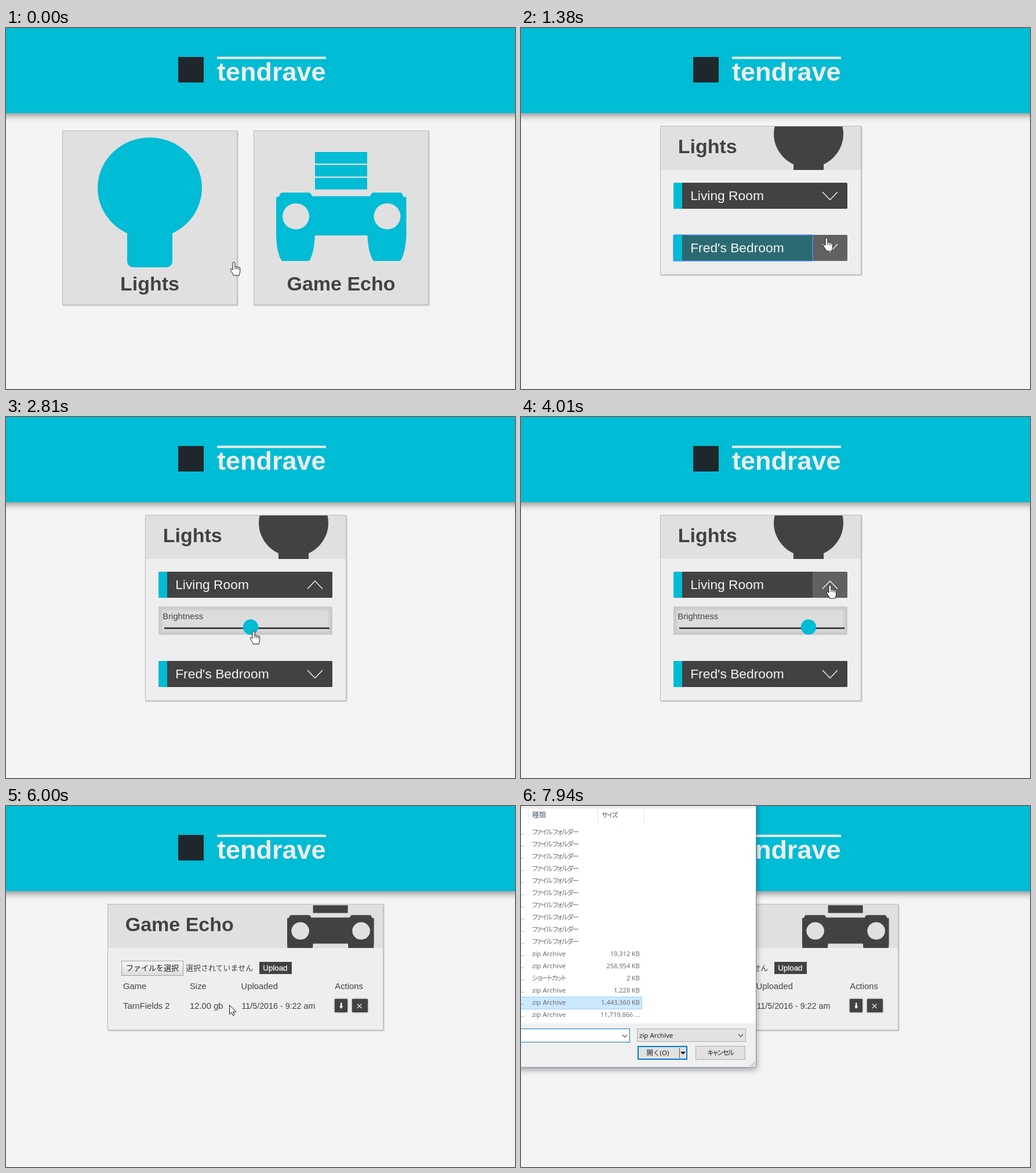
An HTML page that plays this animation: 878x623 px, repeating every 7990 ms.

```html
<!DOCTYPE html>
<html lang="en">
<head>
<meta charset="utf-8">
<title>Home panel</title>
<style>
html, body { margin: 0; width: 100%; height: 100%; overflow: hidden; background: #f4f4f4; }
svg { display: block; font-family: "Liberation Sans", Arial, sans-serif; white-space: pre; }
.title { font-weight: bold; font-size: 34px; fill: #424242; }
.row { font-size: 22.8px; fill: #f4f4f4; }
.cell { font-size: 14.8px; fill: #424242; }
.jp { font: 13px "Noto Sans CJK JP", "Noto Sans CJK", sans-serif; fill: #424242; }
.card { stroke: #bdbdbd; filter: drop-shadow(1px 1px 1px rgba(0,0,0,.28)); }
.file { font: 11.5px "Noto Sans", "Noto Sans CJK JP", sans-serif; fill: #6d6d6d; }
.kana { font: 11.5px "Noto Sans CJK JP", "Noto Sans CJK", sans-serif; fill: #6d6d6d;
  font-feature-settings: "palt"; letter-spacing: -1.4px; }
.dark { fill: #1e1e1e; }
</style>
</head>
<body>
<svg id="stage" width="878" height="623" viewBox="0 0 878 623"></svg>
<script>
const LOOP = 7990, CYAN = '#00bcd4', DARK = '#424242';
const stage = document.getElementById('stage');

// ---- markup helpers ----
const box = (x, y, w, h, fill, more = '') =>
  `<rect x="${x}" y="${y}" width="${w}" height="${h}" fill="${fill}" ${more}/>`;
const label = (x, y, cls, text, more = '') => `<text x="${x}" y="${y}" class="${cls}" ${more}>${text}</text>`;
const line = (d, color, width = 1, more = '') =>
  `<path d="${d}" fill="none" stroke="${color}" stroke-width="${width}" ${more}/>`;
const group = (id, inner, more = '') => `<g id="${id}" ${more}>${inner}</g>`;
const centred = 'text-anchor="middle"', toRight = 'text-anchor="end"';

const bulb = `<ellipse cx="248" cy="276" rx="90" ry="87"/><rect x="209" y="330" width="78" height="83" rx="10"/>`;
const hole = x => `M${x - 23} 325a23 22.5 0 1 0 46 0a23 22.5 0 1 0-46 0Z`;
const pad = [214, 236.3, 258.6].map(y => `<rect x="533" y="${y}" width="90" height="20"/>`).join('') +
  `<path fill-rule="evenodd" d="M466 293Q466 291 471 291Q472 284 477 284H522Q526 284 528 290.300H628
  Q630 284 635 284H680Q684 284 685 291Q690.500 291 690.500 293V358Q689 390 680 402H634Q625 390 623.500 358H533
  Q531 390 523 402H476Q467 390 466 358Z${hole(500)}${hole(657.5)}"/>`;

const homeCard = (x, name, icon) =>
  box(x + .5, 177.5, 301, 300, '#e0e0e0', 'class="card"') +
  `<g fill="${CYAN}">${icon}</g>` + label(x + 151, 453, 'title', name, centred);

const panel = (id, x, w, h, name, icon, dx) =>
  box(x + .5, 169.5, w, h, '#eee', `class="card" id="${id}Card"`) +
  box(x + 1, 170, w - 1, 75, '#e0e0e0') +
  `<g clip-path="url(#headClip)"><g fill="${DARK}" transform="translate(${dx} -1.100) scale(.6667)">${icon}</g></g>` +
  label(x + 30.7, 216, 'title', name);

const lightRow = (id, y, name) => group(id,
  box(263, y, 300, 45, DARK, 'rx="2.500"') +
  box(278, y, 225, 45, DARK, `id="${id}Main"`) +
  `<path id="${id}Side" d="M503 ${y}H560.500a2.500 2.500 0 0 1 2.500 2.500V${y + 42.5}a2.500 2.500 0 0 1-2.500 2.500H503Z" fill="${DARK}"/>` +
  `<path d="M278 ${y}H265.500a2.500 2.500 0 0 0-2.500 2.500V${y + 42.5}a2.500 2.500 0 0 0 2.500 2.500H278Z" fill="${CYAN}"/>` +
  label(292.2, y + 30, 'row', name) +
  line(`M520 ${y + 16}L533 ${y + 29.5}L546 ${y + 16}`, '#f4f4f4', 1.4, `id="${id}Arrow"`));

const slider = group('slider',
  box(263, 327, 300, 49, '#cacaca') +
  box(269, 333, 288, 37, '#dcdcdc', 'style="filter:blur(2px)"') +
  label(270.3, 349, 'cell', 'Brightness') + box(273, 363, 285, 3, DARK) +
  `<circle id="thumb" cy="362.500" r="13.200" fill="${CYAN}"/>`, 'clip-path="url(#sliderClip)"');

const action = (x, w, mark) =>
  box(x, 333, w, 23, DARK, 'rx="1" style="filter:drop-shadow(0 0 1.500px rgba(0,0,0,.5))"') + mark;

const gamePage = panel('game', 175, 475, 217, 'Game Echo', pad, 174.3) +
  box(199.5, 267.5, 106, 25, 'url(#button)', 'stroke="#a0a0a0"') +
  label(207, 284, 'jp dark', 'ファイルを選択') + label(310, 284, 'jp', '選択されていません') +
  box(437, 269, 56, 21, DARK) +
  label(443.3, 284, 'cell', 'Upload', 'style="font-size:13.330px;fill:#f4f4f4;stroke:#f4f4f4;stroke-width:.3px"') +
  [[202, 'Game'], [317, 'Size'], [405.6, 'Uploaded'], [567.3, 'Actions']].map(c => label(c[0], 316, 'cell', c[1])).join('') +
  label(202, 350, 'cell', 'TarnFields 2') + label(317, 350, 'cell', '12.00 gb') +
  label(406.4, 350, 'cell', '11/5/2016 - 9:22 am', 'style="font-size:14.300px"') +
  action(567, 22, '<path d="M577 339.500h2.400v6h2l-3.200 4.500-3.200-4.500h2Z" fill="#fff"/>') +
  action(597, 27, line('M606 341.500l7.500 7.500m0-7.500l-7.500 7.500', '#e8e8e8', 1.3));

// ---- file dialog ----
const FOLDERS = 10;
const files = ['19,312 KB', '258,954 KB', '2 KB', '1,228 KB', '1,443,360 KB', '11,719,866 ...'];
const listRow = i => {
  const y = 49 + 21 * i, n = i - FOLDERS;
  const kind = n < 0 ? 'ファイル フォルダー' : n === 2 ? 'ショートカット' : 'zip Archive';
  return label(5, y, 'file', '...', toRight) + label(19, y, n >= 0 && n !== 2 ? 'file' : 'kana', kind) +
    (n < 0 ? '' : label(205, y, 'file', files[n], toRight + ' style="font-size:11px"'));
};
const chevron = (x, y) => line(`M${x - 4} ${y - 2}l4 4l4-4`, '#444', 1.1);
const combo = box(200.5, 384.5, 187, 22, '#e1e1e1', 'stroke="#adadad"') +
  label(204, 400, 'file dark', 'zip Archive') + chevron(379, 396);
const early = group('early',
  box(-30, 3, 137, 373, '#fff') + box(-30, 384, 218, 24, '#fff') +
  line('M-30 3.500H107M12.500 4V30', '#d8e4ea') + label(19, 20, 'jp', '種類', 'style="font-size:12px;fill:#4c607a"'));
const loaded = group('loaded',
  box(-30, 3, 435, 372, '#fff') + line('M-30 3.500H405', '#e2e2e2') +
  line('M12.500 4V30M132.500 4V30M212.500 4V30', '#e3e3e3') +
  label(19, 20, 'jp', '種類', 'style="font-size:12px;fill:#4c607a"') +
  label(139, 20, 'kana', 'サイズ', 'style="fill:#4c607a"') +
  box(-30, 329.5, 238.5, 21, '#cce8ff', 'id="pick" stroke="#99d1ff"') +
  Array.from({ length: 16 }, (_, i) => listRow(i)).join('') +
  box(-30, 384.5, 217.5, 23, '#fff', 'stroke="#1a72b8"') + chevron(179, 397) +
  box(202, 415, 84, 22, '#e1e1e1', 'stroke="#0078d7" stroke-width="2"') +
  line('M273.500 417V435', '#555') + '<path d="M275 424h9l-4.500 5Z" fill="#222"/>' +
  label(236, 430, 'file dark', '開く(O)', centred) +
  box(301.5, 414.5, 85, 23, '#e1e1e1', 'stroke="#adadad"') +
  label(344, 430, 'kana dark', 'キャンセル', centred) +
  [[401, 441], [398, 444], [401, 444], [395, 447], [398, 447], [401, 447]].map(p => box(p[0], p[1], 2, 2, '#b8b8b8')).join(''));
const dialog = group('dialog',
  box(-60, -60, 465.5, 511, '#f0f0f0', 'stroke="#7d97a5" style="filter:drop-shadow(0 3px 6px rgba(0,0,0,.4))"') +
  early + loaded + combo);

const header = box(-40, -40, 958, 187, CYAN, 'style="filter:drop-shadow(0 4px 6px rgba(0,0,0,.42))"') +
  box(297, 50, 44, 44, '#1e282c') + box(364, 49.5, 188, 4, '#eee') +
  label(364, 91, '', 'tendrave', 'font-weight="bold" font-size="45" fill="#eee"');

const cursor = group('cursor',
  `<path id="arrow" d="M.5 .5V16.500L4.200 13.200L6.600 18.500L9 17.500L6.600 12.200H11.800Z"/>` +
  `<path id="hand" d="M-2 13.500V2a2 2 0 0 1 4 0V8a1.700 1.700 0 0 1 3 .7a1.700 1.700 0 0 1 3 .9a1.500 1.500 0 0 1 2.700 1.400V16c0 2.500-1.300 3.500-1.500 7H-.5C-1 19.500-4.600 17-5.700 13c-.2-2 2.200-2.200 3.700.5ZM2 8v4M5 9v3.500M8 10v3"/>`,
  'fill="#fff" stroke="#111" stroke-linejoin="round"');

stage.innerHTML = `<defs>
  <clipPath id="headClip"><rect x="170" y="170" width="500" height="75"/></clipPath>
  <clipPath id="sliderClip"><rect id="sliderBox" x="263" y="327" width="300" height="49"/></clipPath>
  <linearGradient id="button" x2="0" y2="1"><stop stop-color="#f6f6f6"/><stop offset="1" stop-color="#dcdcdc"/></linearGradient>
</defs>` + box(0, 0, 878, 623, '#f4f4f4') + header +
  group('home', homeCard(97, 'Lights', bulb) + homeCard(427, 'Game Echo', pad)) +
  group('lights', panel('lights', 240, 346, 256, 'Lights', bulb, 330.7) +
    lightRow('living', 267, 'Living Room') + slider + lightRow('bed', 357, "Fred's Bedroom") +
    box(263, 357, 240, 45, 'none', 'id="ring" rx="1.500" stroke="#4d90fe" stroke-width="2" opacity=".7"')) +
  group('game', gamePage) + dialog + cursor;

// ---- motion ----
const $ = id => document.getElementById(id);
const show = (id, on) => $(id).style.display = on ? '' : 'none';
const ramp = (t, a, b) => Math.min(1, Math.max(0, (t - a) / (b - a)));
const smooth = k => k * k * (3 - 2 * k);

// time, x, y of the pointer tip
const path = [
  [30, 393, 404], [600, 300, 332], [1000, 300, 332], [1200, 400, 374], [1260, 430, 370], [1380, 527, 362],
  [1580, 533, 290], [1840, 533, 290], [2300, 420, 369], [2450, 420, 369], [2600, 403, 371], [2680, 403, 371],
  [2810, 427, 369], [2990, 496, 371], [3140, 496, 371], [3190, 501, 371], [3550, 501, 371], [3950, 533, 290],
  [4390, 533, 290], [4980, 490, 85], [5240, 490, 85], [5580, 568, 337], [5850, 568, 337], [6000, 385, 343],
  [6350, 250, 282], [6510, 248, 297], [6880, 248, 297], [7100, -40, 360]
];
function pointer(t) {
  const i = path.findIndex(p => p[0] > t);
  if (i === 0) return path[0].slice(1);
  if (i < 0) return path[path.length - 1].slice(1);
  const [a, b] = [path[i - 1], path[i]], k = smooth(ramp(t, a[0], b[0]));
  return [a[1] + (b[1] - a[1]) * k, a[2] + (b[2] - a[2]) * k];
}
const mix = k => `rgb(${[[66, 0], [66, 188], [66, 212]].map(c => Math.round(c[0] + (c[1] - c[0]) * k))})`;

function draw(t) {
  const page = t < 640 ? 'home' : t < 5160 ? 'lights' : t < 5670 ? 'home' : 'game';
  ['home', 'lights', 'game'].forEach(p => show(p, p === page));

  const [x, y] = pointer(t);
  const over = (l, top, r, b) => x >= l && x <= r && y >= top && y <= b;
  const open = smooth(ramp(t, 1640, 1790)) - smooth(ramp(t, 4090, 4290));
  const drop = 64 * open;

  // light rows and slider
  $('lightsCard').setAttribute('height', 256 + drop);
  $('bed').setAttribute('transform', `translate(0 ${drop})`);
  $('sliderBox').setAttribute('height', 49 * open);
  $('livingArrow').setAttribute('transform', t >= 1640 && t < 4090 ? 'rotate(180 533 289.750)' : '');
  const hot = [over(503, 267, 563, 312), over(503, 357 + drop, 563, 402 + drop)];
  $('livingSide').setAttribute('fill', hot[0] ? '#616161' : DARK);
  $('bedSide').setAttribute('fill', hot[1] ? '#616161' : DARK);
  $('bedMain').setAttribute('fill', mix(ramp(t, 1080, 1240) * (1 - ramp(t, 1260, 1440))));
  show('ring', t > 1180 && t < 1640);
  $('thumb').setAttribute('cx', t < 2450 ? 415 : t < 3200 ? x - 5 : 496);

  // dialog grows and fades in, then its list fills
  const grow = ramp(t, 6720, 6960), size = 1 - .059 * (1 - grow) ** 2;
  show('dialog', grow > 0);
  $('dialog').setAttribute('opacity', 1 - (1 - grow) ** 2.4);
  $('dialog').setAttribute('transform', `translate(-133 157) scale(${size}) translate(133 -157)`);
  show('early', t < 6990);
  show('loaded', t >= 6990);
  show('pick', t >= 7800);
  $('pick').setAttribute('fill', t < 7930 ? '#e5f3ff' : '#cce8ff');
  $('pick').setAttribute('stroke', t < 7930 ? '#e5f3ff' : '#99d1ff');

  const hand = page === 'home' ? over(97, 177, 399, 478) || over(427, 177, 729, 478)
    : page === 'lights' ? over(263, 267, 563, 312) || over(263, 357 + drop, 563, 402 + drop) ||
      open > .9 && over(273, 349, 558, 376)
    : over(567, 333, 589, 356);
  show('hand', hand);
  show('arrow', !hand);
  $('cursor').setAttribute('transform', `translate(${Math.round(x)} ${Math.round(y)})`);
}

function tick() {
  draw(performance.now() % LOOP);
  requestAnimationFrame(tick);
}
tick();
</script>
</body>
</html>
```
